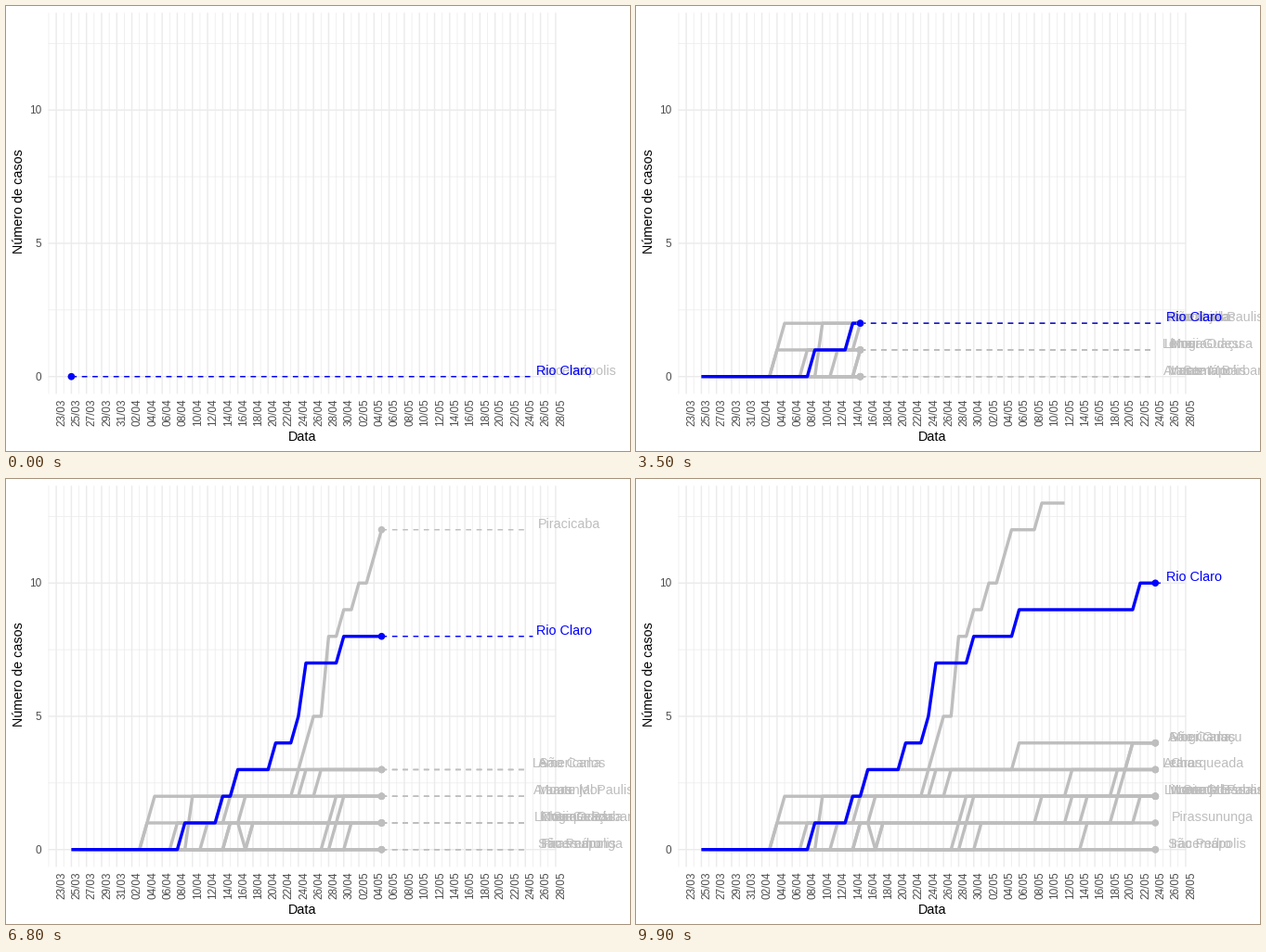
Recreate the animation shown at these times as a matplotlib script. Size 672 px wide and 480 px high, loop 10000 ms.

```python
import numpy as np
import matplotlib as mpl

mpl.rcParams["font.family"] = "Liberation Sans"
mpl.rcParams["path.simplify"] = False

import matplotlib.pyplot as plt
from matplotlib.animation import FuncAnimation
from matplotlib.patches import Circle

W, H, DPI = 672, 480, 96
FRAMES, LAST = 100, 60
LEFT, RIGHT, TOP, BOTTOM = 45.55, 592.3, 7.3, 418.4
GREY, BLUE, GRID, TICK = "#BEBEBE", "#0000FF", "#EBEBEB", "#4D4D4D"
MAIN, ENDS_EARLY = "Rio Claro", {"Piracicaba": 48}

# Towns join in waves, one per day from the given day on.
# Each lists the days its count goes up by one (negative: down by one).
WAVES = {
    0: {
        "Iracemápolis": [],
        "Americana": [16, 16, 22, 42],
        "São Carlos": [10, 11, 31, 57],
        "Nova Odessa": [10, 45],
        "Limeira": [21, 49],
        "Mogi Guaçu": [18, -23, 24, *range(55, 58)],
        "Piracicaba": [14, 21, *range(30, 33), *[34] * 3, *range(36, 41, 2),
                       41, 45],
    },
    13: {
        "Araras": [35, 36, 49],
        "Laranjal Paulista": [14, 20],
        "Santa Bárbara d'Oeste": [24, 58],
        "Monte Mor": [34, 35],
        "Leme": [21, 23, 33],
    },
    28: {
        "Charqueada": [37, 51, 55],
        "São Pedro": [],
        "Pirassununga": [51],
    },
}
MAIN_STEPS = [15, 20, 22, 27, 30, 31, 31, 36, 42, 58]

DAYS = np.arange(LAST + 1)
KNOTS = np.round((FRAMES - 1) * DAYS / LAST)  # frame on which each day lands
DAY_0 = np.datetime64("2020-03-25")


def px(day):
    return LEFT + (np.asarray(day) + 3.05) * (RIGHT - LEFT) / 67.1


def py(value):
    return BOTTOM - (np.asarray(value) + 0.65) * (BOTTOM - TOP) / 14.3


fig = plt.figure(figsize=(W / DPI, H / DPI), dpi=DPI, facecolor="white")
ax = fig.add_axes([0, 0, 1, 1])
ax.set_xlim(0, W)
ax.set_ylim(H, 0)
ax.axis("off")


def stroke(xs, ys, color, width, z, **kw):
    line, = ax.plot(xs, ys, color=color, lw=width * 72 / DPI, zorder=z,
                    solid_capstyle="butt", dash_capstyle="butt",
                    solid_joinstyle="round", **kw)
    line.set_snap(False)
    return line


def label(x, y, text, size, color, **kw):
    kw = {"ha": "center", "va": "baseline", "rotation_mode": "anchor", **kw}
    return ax.text(x, y, text, fontsize=size, color=color, **kw)


def date(day):
    _, month, dom = str(DAY_0 + day).split("-")
    return f"{dom}/{month}"


def draw_axes():
    for day in range(-3, 65):
        major = day % 2 == 0
        stroke([px(day)] * 2, [TOP, BOTTOM], GRID, 1.42 if major else 0.71, 0)
        if major:
            label(px(day) + 9.2, 438.2, date(day), 8.8, TICK, rotation=90)
    for value in np.arange(0, 13, 2.5):
        major = value % 5 == 0
        y = py(value)
        stroke([LEFT, RIGHT], [y, y], GRID, 1.42 if major else 0.71, 0)
        if major:
            label(38.6, y + 4.2, f"{value:.0f}", 8.8, TICK, ha="right")
    label((LEFT + RIGHT) / 2, 469.2, "Data", 10.8, "black")
    label(18, (TOP + BOTTOM) / 2 - 2, "Número de casos", 10.8, "black",
          rotation=90)


class Series:
    def __init__(self, name, start, steps):
        self.start, self.end = start, ENDS_EARLY.get(name, LAST)
        steps = np.array(steps, dtype=int)
        self.values = (np.sign(steps) * (DAYS[:, None] >= abs(steps))).sum(1)
        main = name == MAIN
        color, top = (BLUE, 0.5) if main else (GREY, 0)
        self.goal = px(LAST + main)
        self.line = stroke([], [], color, 3.41, 2 + top)
        self.dash = stroke([], [], color, 1.42, 3 + top, linestyle=(0, (4, 4)))
        self.dot = ax.add_patch(Circle((0, 0), 3.79, fc=color, lw=0,
                                       zorder=4 + top))
        self.text = label(0, 0, name, 10.8, color, ha="left", zorder=5 + top)
        width = self.text.get_window_extent().width
        self.text.set_x(px(LAST) + 0.2 * width)

    def update(self, now):
        live = self.start <= now <= self.end
        self.line.set_visible(now > self.start)
        for part in (self.dash, self.dot, self.text):
            part.set_visible(live)
        if now < self.start:
            return
        tip = min(now, self.end)
        days = np.append(np.arange(self.start, int(tip) + 1), tip)
        xs, ys = px(days), py(np.interp(days, DAYS, self.values))
        x, y = xs[-1], ys[-1]
        self.line.set_data(xs, ys)
        self.dash.set_data([x, self.goal], [y, y])
        self.dot.center = x, y
        self.text.set_y(y - 2.2)


draw_axes()
series = [Series(name, first + i, steps)
          for first, towns in WAVES.items()
          for i, (name, steps) in enumerate(towns.items())]
series.append(Series(MAIN, 0, MAIN_STEPS))


def update(frame):
    now = np.interp(frame, KNOTS, DAYS)
    for s in series:
        s.update(now)
    return []


anim = FuncAnimation(fig, update, frames=FRAMES, interval=100,
                     init_func=lambda: update(0), repeat=True, repeat_delay=0)
plt.show()
```
